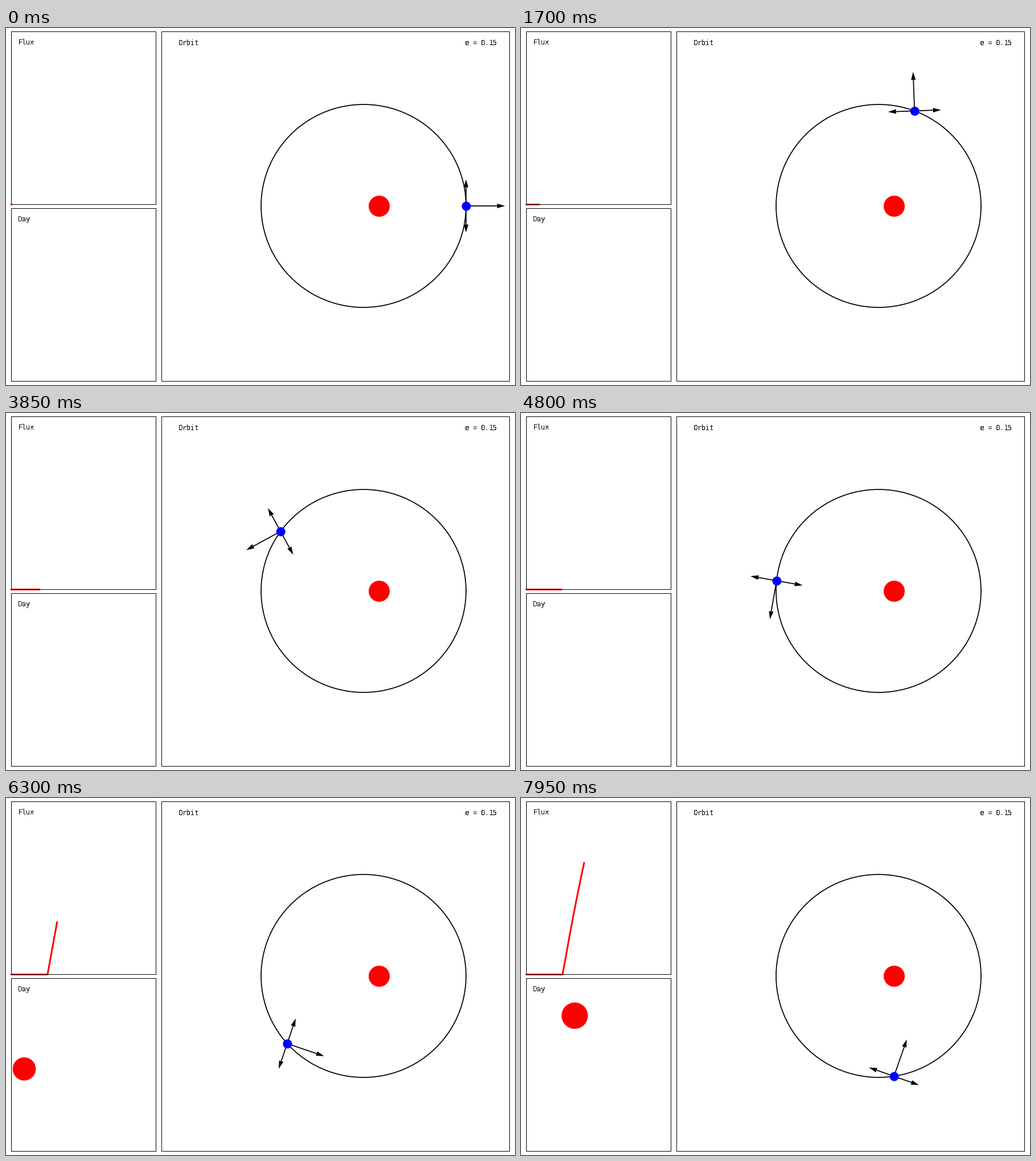
These frames come from a looping animation (894 by 626 pixels, 8 s). A matplotlib script:

```python
import numpy as np
import matplotlib.pyplot as plt
from matplotlib.animation import FuncAnimation
from matplotlib.patches import Circle, Polygon, Rectangle

# Full-pixel hinting keeps the small labels crisp
plt.rcParams["text.hinting_factor"] = 1

W, H, DPI = 894, 626, 100
PX = 72 / DPI                      # one pixel in points
FRAMES, STEP = 160, 50

ECC, AXIS = 0.15, 180.0
MINOR = AXIS * np.sqrt(1 - ECC ** 2)
CX, CY = 628.5, 312.5
STAR = (CX + ECC * AXIS, CY)
RATE = 0.03152                     # mean anomaly per frame
SPIN = 1.5                         # rotations per orbit

RED, BLUE, BLACK = "#ff0000", "#0000ff", "#000000"
THIN = 1.75
NUDGE = 0.5                        # thin strokes sit on pixel edges, not centres


def solve_orbit(mean):
    """Return planet position, star distance (in axes) and zenith angle of the star."""
    ecc_anom = mean + ECC * np.sin(mean)
    for _ in range(8):
        ecc_anom = ecc_anom - (ecc_anom - ECC * np.sin(ecc_anom) - mean) / (1 - ECC * np.cos(ecc_anom))
    dx = np.cos(ecc_anom) - ECC
    dy = MINOR / AXIS * np.sin(ecc_anom)
    x, y = CX + AXIS * np.cos(ecc_anom), CY - MINOR * np.sin(ecc_anom)
    zenith = np.arctan2(dy, dx) + np.pi - SPIN * mean
    return x, y, np.hypot(dx, dy), zenith


mean = RATE * np.arange(FRAMES)
px, py, dist, zenith = solve_orbit(mean)
height = np.cos(zenith)
flux_x = 9.5 + 254 * mean / (4 * np.pi)
flux_y = 309.5 - 198 * np.maximum(height, 0) / dist ** 2

fig = plt.figure(figsize=(W / DPI, H / DPI), dpi=DPI, facecolor="white")
ax = fig.add_axes([0, 0, 1, 1])
ax.set_xlim(0, W)
ax.set_ylim(H, 0)
ax.axis("off")


def stroke(width, color=BLACK, z=2, xs=(), ys=(), cap="projecting"):
    line, = ax.plot(xs, ys, color=color, lw=width * PX, zorder=z, snap=False,
                    solid_capstyle=cap, solid_joinstyle="round")
    return line


def disc(center, radius, color, z):
    return ax.add_patch(Circle(center, radius, fc=color, ec="none", zorder=z))


def label(x, y, text):
    ax.text(x, y, text, family="DejaVu Sans Mono", size=11.63 * PX, color=BLACK,
            va="baseline", ha="left", antialiased=False, zorder=7)


for x0, y0, x1, y1 in [(9, 6, 263, 309), (9, 316, 263, 619), (273, 6, 884, 619)]:
    ax.add_patch(Rectangle((x0 + 0.5, y0 + 0.5), x1 - x0, y1 - y0, fill=False, ec=BLACK,
                           lw=PX, zorder=6, snap=False, joinstyle="miter"))

label(21, 29, "Flux")
label(21, 339, "Day")
label(303, 30, "Orbit")
label(806, 30, "e = 0.15")

turn = np.linspace(0, 2 * np.pi, 100)
stroke(THIN, xs=CX - NUDGE + AXIS * np.cos(turn), ys=CY - NUDGE - MINOR * np.sin(turn))
disc(STAR, 18.5, RED, 3)

planet = disc((0, 0), 8, BLUE, 5)
sun = disc((0, 0), 20, RED, 3)
flux = stroke(3, RED, 4)

# Zenith arrow and the two horizon arrows: (turn from zenith, length)
ARROWS = [(0, 68.5), (np.pi / 2, 46.5), (-np.pi / 2, 46.5)]
shafts = [stroke(THIN, z=4, cap="butt") for _ in ARROWS]
heads = [ax.add_patch(Polygon(np.zeros((3, 2)), fc=BLACK, ec="none", zorder=4, snap=False))
         for _ in ARROWS]


def place_arrow(shaft, head, start, angle, length):
    along = np.array([np.cos(angle), -np.sin(angle)])
    across = np.array([-along[1], along[0]])
    tip, neck = start + length * along, start + (length - 14) * along
    shaft.set_data([start[0], neck[0]], [start[1], neck[1]])
    head.set_xy([tip, neck + 4 * across, neck - 4 * across])


def update(i):
    pos = np.array([px[i], py[i]])
    planet.center = tuple(pos)
    for shaft, head, (offset, length) in zip(shafts, heads, ARROWS):
        place_arrow(shaft, head, pos - NUDGE, SPIN * mean[i] + offset, length)

    # A lone starting point still shows as a square dot
    xs, ys = flux_x[:i + 1], flux_y[:i + 1]
    flux.set_data(np.append(xs, xs[-1] + 0.01), np.append(ys, ys[-1]))

    sun.set_visible(bool(height[i] > 0))
    sun.center = (136.5 - 127.5 * np.sin(zenith[i]), 619.5 - 252 * height[i])
    sun.set_radius(22.6 / dist[i])
    return [planet, sun, flux, *shafts, *heads]


anim = FuncAnimation(fig, update, frames=FRAMES, init_func=lambda: update(0),
                     interval=STEP, repeat=True, repeat_delay=0, blit=False)
plt.show()
```
